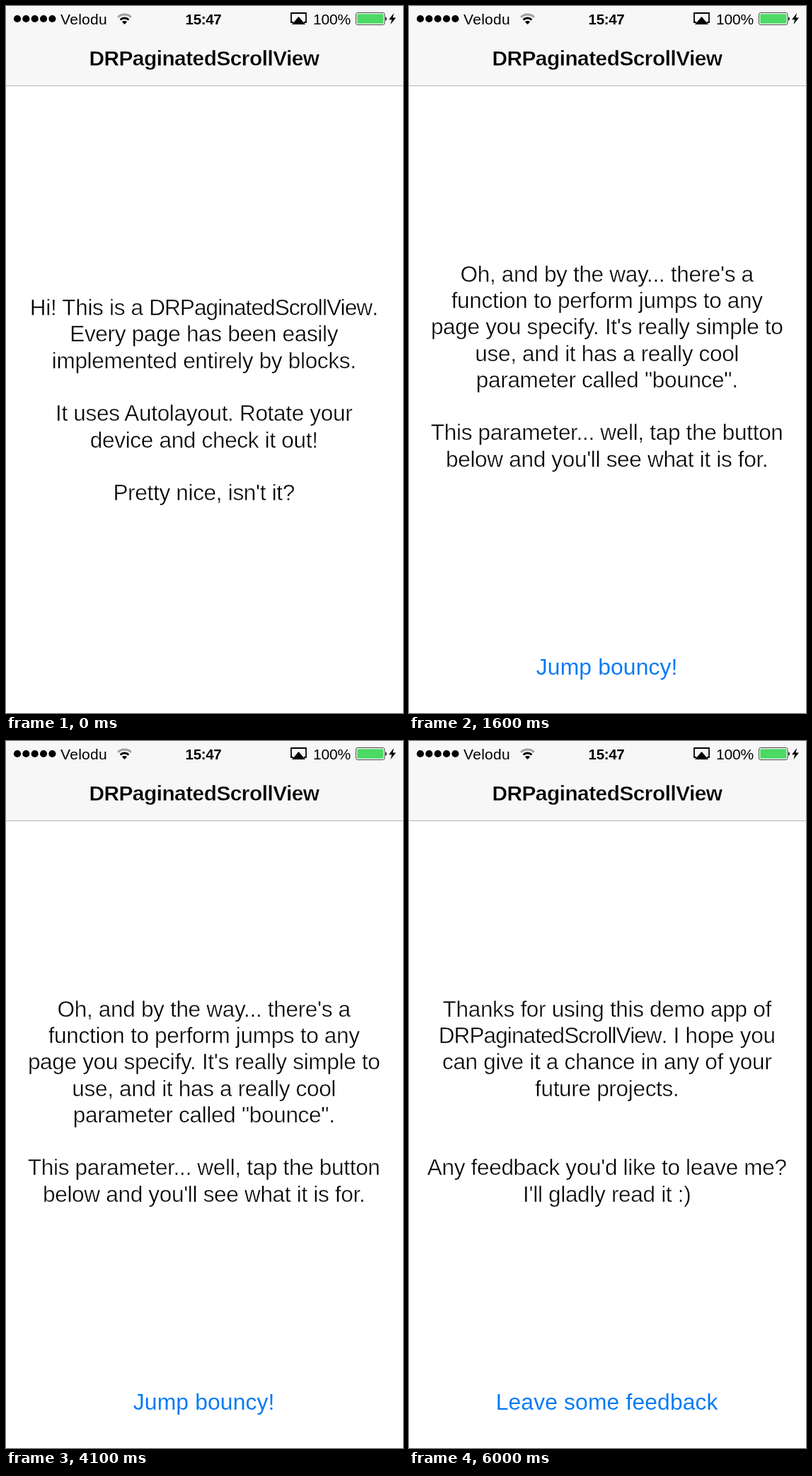
An HTML page that plays this animation: 561x997 px, repeating every 6.1 s.

```html
<!DOCTYPE html>
<html lang="en">
<head>
<meta charset="utf-8">
<title>DRPaginatedScrollView</title>
<style>
  html, body { margin: 0; width: 100%; height: 100%; overflow: hidden; background: #fff; }
  svg { display: block; width: 561px; height: 997px; }
  text { font-family: "Liberation Sans", Arial, sans-serif; }
  /* a white outline over the fill gives the light weight */
  .body { font-size: 31.5px; letter-spacing: -.31px; text-anchor: middle; stroke: #fff; stroke-width: .5px; }
  .body .tight { letter-spacing: -.9px; }
  .button { font-size: 31.8px; letter-spacing: .15px; text-anchor: middle; fill: #0079f4; stroke: #fff; stroke-width: .1px; }
  .title { font-size: 29.8px; font-weight: bold; letter-spacing: -.5px; text-anchor: middle; stroke: #f7f7f7; stroke-width: .4px; }
  .status { font-size: 21px; }
  .clock { font-size: 20.5px; font-weight: bold; letter-spacing: -.3px; text-anchor: middle; }
</style>
</head>
<body>
<svg viewBox="0 0 561 997">
  <rect width="561" height="997" fill="#fff"/>
  <g id="pages"></g>
  <g id="bar">
    <rect width="561" height="112" fill="#f7f7f7"/>
    <rect y="112" width="561" height="1" fill="#b5b5b5"/>
    <g id="dots"></g>
    <text class="status" x="77" y="26" letter-spacing=".3">Velodu</text>
    <g fill="none">
      <path d="M158.2 15.8A13.5 13.5 0 0 1 176.8 15.8" stroke="#a0a0a0" stroke-width="3"/>
      <path d="M161.6 19.4A8.5 8.5 0 0 1 173.4 19.4" stroke="#000" stroke-width="2.8"/>
    </g>
    <path d="M167.5 26L164 22.4A5 5 0 0 1 171 22.4Z"/>
    <text class="clock" x="279" y="26">15:47</text>
    <path d="M406 23H403V10H424V23H421" fill="none" stroke="#000" stroke-width="1.8"/>
    <path d="M413.5 15L423 26H404Z"/>
    <text class="status" x="434" y="26" letter-spacing="-.2">100%</text>
    <rect x="494.5" y="9.5" width="40.5" height="17" rx="2.5" fill="#fff" stroke="#444" stroke-width="1"/>
    <rect x="496.2" y="11.2" width="37.1" height="13.6" rx="1.3" fill="#4cd964"/>
    <path d="M536 15.2Q538 15.6 538 18T536 20.8Z" fill="#222"/>
    <path d="M548 10L541 19.2H545.2L543.4 26L551 16.4H546.6Z"/>
    <text class="title" x="280" y="84">DRPaginatedScrollView</text>
  </g>
</svg>
<script>
const NS = "http://www.w3.org/2000/svg";
const WIDTH = 561, LOOP = 6100, STEP = 100, LINE = 37.3;
const NAME = "DRPaginatedScrollView";

const pages = [
  { top: 436, lines: ["Hi! This is a " + NAME + ".", "Every page has been easily",
    "implemented entirely by blocks.", "", "It uses Autolayout. Rotate your",
    "device and check it out!", "", "Pretty nice, isn't it?"] },
  { top: 388.6, button: "Jump bouncy!", lines: ["Oh, and by the way... there's a",
    "function to perform jumps to any", "page you specify. It's really simple to",
    "use, and it has a really cool", "parameter called \"bounce\".", "",
    "This parameter... well, tap the button", "below and you'll see what it is for."] },
  { top: 388.6, button: "Leave some feedback", lines: ["Thanks for using this demo app of",
    NAME + ". I hope you", "can give it a chance in any of your", "future projects.", "", "",
    "Any feedback you'd like to leave me?", "I'll gladly read it :)"] }
];

function add(parent, tag, attrs, text) {
  const el = document.createElementNS(NS, tag);
  for (const key in attrs) el.setAttribute(key, attrs[key]);
  if (text) el.textContent = text;
  return parent.appendChild(el);
}

function addLine(parent, str, x, y) {
  const el = add(parent, "text", { class: "body", x, y });
  str.split(NAME).forEach((part, i) => {
    if (i) add(el, "tspan", { class: "tight" }, NAME);
    if (part) add(el, "tspan", {}, part);
  });
}

const strip = document.getElementById("pages");
const buttons = pages.map((page, n) => {
  const x = 279.7 + n * WIDTH;
  page.lines.forEach((str, i) => str && addLine(strip, str, x, page.top + i * LINE));
  return page.button && add(strip, "text", { class: "button", x, y: 942.6 }, page.button);
});

const dots = document.getElementById("dots");
for (let i = 0; i < 5; i++) add(dots, "circle", { cx: 16 + i * 12.35, cy: 18, r: 5.1 });

const clamp = v => Math.max(0, Math.min(1, v));
const smooth = v => v * v * (3 - 2 * v);

// finger drag, then the paging slows down to rest
function swipe(t) {
  if (t < 400) return 0;
  if (t <= 600) return 215 * ((t - 340) / 260) ** 1.4;
  return t < 1600 ? WIDTH - 346 * Math.exp((600 - t) / 150) : WIDTH;
}

// jump past the page edge and back
function jump(t) {
  if (t < 4800) return 0;
  const over = 40;
  return (WIDTH + over) * smooth(clamp((t - 4759) / 400)) - over * smooth(clamp((t - 5159) / 240));
}

function draw(now) {
  const t = Math.floor(now % LOOP / STEP) * STEP;
  strip.setAttribute("transform", `translate(${-(swipe(t) + jump(t)).toFixed(2)} 0)`);
  buttons[1].setAttribute("opacity", t < 4800 ? 1 : 0.25 + 0.75 * clamp((t - 4800) / 400));
}

function tick() {
  draw(performance.now());
  requestAnimationFrame(tick);
}
tick();
</script>
</body>
</html>
```
